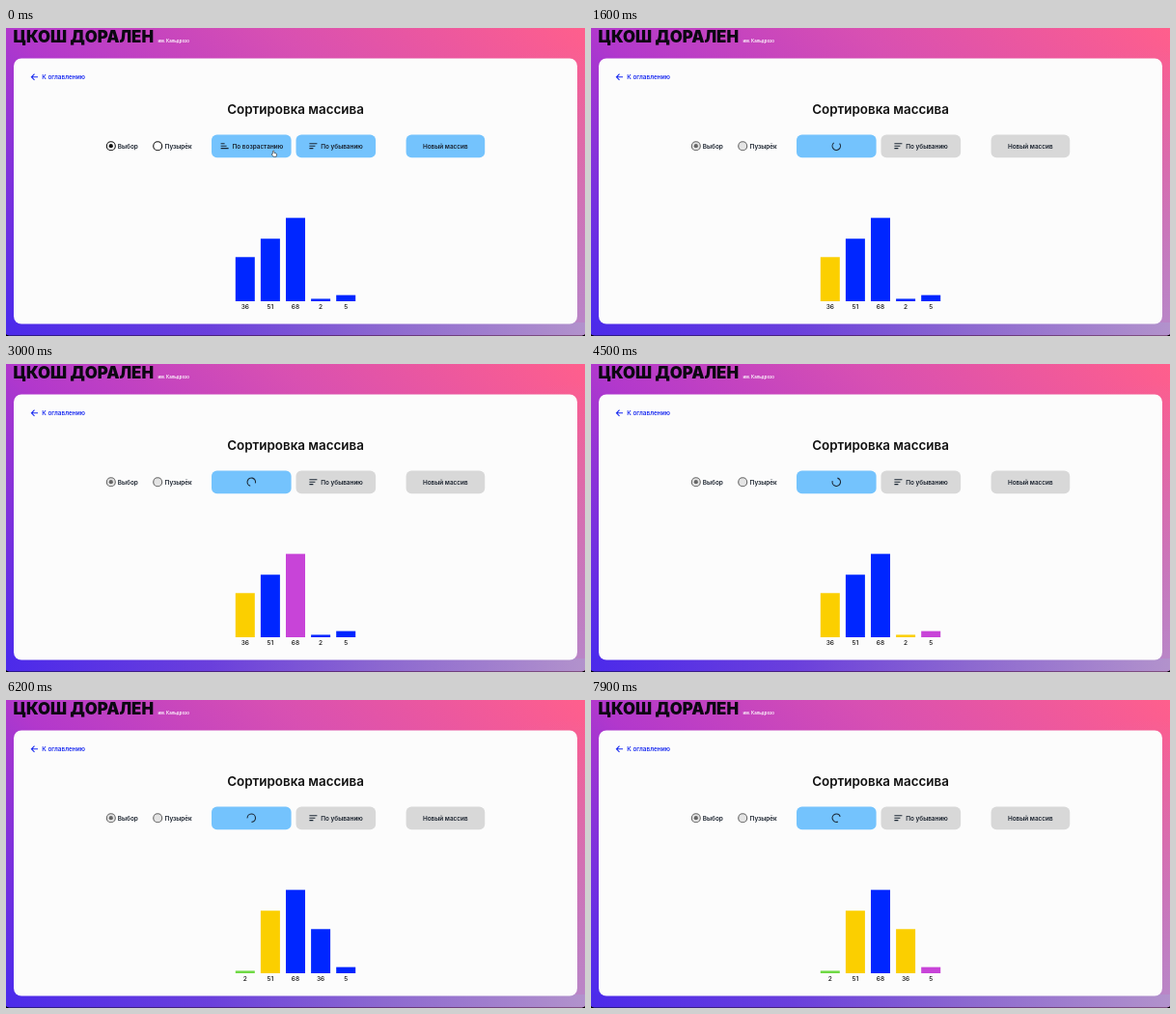
Animation of 600x319 px, one loop 8000 ms. Source, as an HTML page:

```html
<!DOCTYPE html>
<html lang="ru">
<head>
<meta charset="utf-8">
<title>Сортировка массива</title>
<style>
  html, body { margin: 0; width: 100%; height: 100%; overflow: hidden; background: #000; }
  svg { display: block; width: 100%; height: 100%; font-family: Inter, "Open Sans", sans-serif; }
  .label { font-size: 6.4px; font-weight: 600; fill: #18202c; }
  .value { font-size: 6.6px; font-weight: 500; fill: #111; text-anchor: middle; }
  .icon { fill: none; stroke: #1c2836; stroke-width: 1.1; }
</style>
</head>
<body>
<svg id="stage" viewBox="0 0 600 319" preserveAspectRatio="none">
  <defs>
    <linearGradient id="sky" gradientUnits="userSpaceOnUse" x1="70" y1="389" x2="530" y2="-70">
      <stop offset="0" stop-color="#462aee"/>
      <stop offset=".35" stop-color="#b238cc"/>
      <stop offset=".65" stop-color="#d850b2"/>
      <stop offset="1" stop-color="#ff5f8c"/>
    </linearGradient>
    <radialGradient id="haze" gradientUnits="userSpaceOnUse" cx="600" cy="319" r="300">
      <stop offset="0" stop-color="#b292cc" stop-opacity=".85"/>
      <stop offset="1" stop-color="#b292cc" stop-opacity="0"/>
    </radialGradient>
    <linearGradient id="floor">
      <stop offset="0" stop-color="#4c2aea"/>
      <stop offset=".35" stop-color="#6a3fdc"/>
      <stop offset=".65" stop-color="#8c68d0"/>
      <stop offset="1" stop-color="#b292cc"/>
    </linearGradient>
  </defs>
  <rect width="600" height="319" fill="#000"/>
  <path id="wall" d="M0 0H600V315Q600 318.2 596.8 318.2H3.2Q0 318.2 0 315Z" fill="url(#sky)"/>
  <use href="#wall" fill="none"/>
  <path d="M0 0H600V315Q600 318.2 596.8 318.2H3.2Q0 318.2 0 315Z" fill="url(#haze)"/>
  <path d="M0 305H600V315Q600 318.2 596.8 318.2H3.2Q0 318.2 0 315Z" fill="url(#floor)"/>
  <text x="7.5" y="15.4" font-size="16.8" font-weight="900" fill="#0c0812">ЦКОШ ДОРАЛЕН</text>
  <text x="157.5" y="15" font-size="4.4" font-weight="600" fill="#fff">им. Кальдрозо</text>
  <rect x="8" y="31.4" width="584" height="275.2" rx="8" fill="#fcfcfc"/>
  <path d="M33 50.8H26.6M29.5 47.7L26.4 50.8L29.5 53.9" fill="none" stroke="#1a2cf0" stroke-width="1.1"/>
  <text x="37.3" y="53.2" class="label" style="fill:#1a2cf0">К оглавлению</text>
  <text x="300" y="88.7" font-size="13.4" font-weight="600" text-anchor="middle" fill="#111">Сортировка массива</text>

  <g id="radios" stroke-width="1.1">
    <circle cx="108.8" cy="122.2" r="4.5"/>
    <circle cx="157.2" cy="122.2" r="4.5"/>
  </g>
  <circle id="dot" cx="108.8" cy="122.2" r="2.1"/>
  <text x="115.8" y="124.6" class="label">Выбор</text>
  <text x="164.6" y="124.6" class="label">Пузырёк</text>

  <rect id="ascending" x="213" y="110.6" width="82.6" height="23.6" rx="5.5"/>
  <g id="ascendingLabel">
    <path class="icon" d="M222.6 119.8h4M222.6 122.2h6M222.6 124.6h8"/>
    <text x="234.6" y="124.6" class="label">По возрастанию</text>
  </g>
  <path id="spinner" class="icon" d="M0 -4.2A4.2 4.2 0 1 1 -4.2 0"/>
  <rect class="other" x="300.5" y="110.6" width="82.6" height="23.6" rx="5.5"/>
  <path class="icon" d="M314.4 119.8h8M314.4 122.2h6M314.4 124.6h4"/>
  <text x="326.3" y="124.6" class="label">По убыванию</text>
  <rect class="other" x="414.6" y="110.6" width="81.6" height="23.6" rx="5.5"/>
  <text x="455.3" y="124.6" class="label" text-anchor="middle">Новый массив</text>

  <g id="bars"></g>
  <path id="cursor" d="M-1 -3.2q.8 -.7 1.3 .2v1.8l2 .5q.8 .3 .7 1.2l-.5 2.2h-3l-1.8 -2.2q0 -.8 .9 -.5z" fill="#fff" stroke="#222" stroke-width=".6"/>
</svg>
<script>
const LOOP = 8000, CLICK = 1300, START = 1400, STEP = 700;
const BLUE = "#0026ff", YELLOW = "#fbcf00", PURPLE = "#c844d8", GREEN = "#6fd944";
const byId = id => document.getElementById(id);
const others = document.querySelectorAll(".other");

const initial = [36, 51, 68, 2, 5];
const swapped = [2, 51, 68, 36, 5];

// Each step: array order, sorted count, yellow indexes, compared index.
const steps = [
  [initial, 0, [0]],
  [initial, 0, [0], 1],
  [initial, 0, [0], 2],
  [initial, 0, [0], 3],
  [initial, 0, [0, 3], 4],
  [swapped, 1, []],
  [swapped, 1, [1]],
  [swapped, 1, [1], 2],
  [swapped, 1, [1], 3],
  [swapped, 1, [1, 3], 4]
];
const idle = [initial, 0, []];

function make(tag, attrs) {
  const node = document.createElementNS("http://www.w3.org/2000/svg", tag);
  for (const key in attrs) node.setAttribute(key, attrs[key]);
  return byId("bars").appendChild(node);
}

const bars = initial.map((_, i) => {
  const x = 237.8 + i * 26.1;
  return {
    rect: make("rect", { x, width: 20 }),
    text: make("text", { x: x + 10, y: 290.6, class: "value" })
  };
});

const clamp = v => Math.max(0, Math.min(1, v));
const mix = (a, b, p) => `rgb(${a.map((v, i) => Math.round(v + (b[i] - v) * p))})`;
const show = (id, on) => byId(id).setAttribute("visibility", on ? "visible" : "hidden");

function drawBars(t) {
  const [values, sorted, marked, compared] = steps[Math.floor((t - START) / STEP)] || idle;
  bars.forEach(({ rect, text }, i) => {
    const height = values[i] * 1.27;
    rect.setAttribute("y", 283 - height);
    rect.setAttribute("height", height);
    rect.setAttribute("fill", i < sorted ? GREEN : i === compared ? PURPLE : marked.includes(i) ? YELLOW : BLUE);
    text.textContent = values[i];
  });
}

function render(t) {
  const busy = t >= CLICK;
  const hover = busy ? 0 : clamp((t - 50) / 250);
  byId("ascending").setAttribute("fill", mix([116, 195, 253], [74, 174, 248], hover));
  others.forEach(node => node.setAttribute("fill", busy ? "#d8d8d8" : "#74c3fd"));
  byId("radios").setAttribute("fill", busy ? "#e4e4e4" : "#fff");
  byId("radios").setAttribute("stroke", busy ? "#666" : "#111");
  byId("dot").setAttribute("fill", busy ? "#666" : "#111");
  show("ascendingLabel", !busy);
  show("spinner", busy);
  show("cursor", !busy);
  byId("spinner").setAttribute("transform", `translate(254.3 122.2) rotate(${195 + t * 0.36})`);
  byId("cursor").setAttribute("transform", `translate(${277.6 + 1.8 * clamp(t / 300)} 130.6)`);
  drawBars(t);
}

function tick(now) {
  render(now % LOOP);
  requestAnimationFrame(tick);
}
render(0);
requestAnimationFrame(tick);
</script>
</body>
</html>
```
